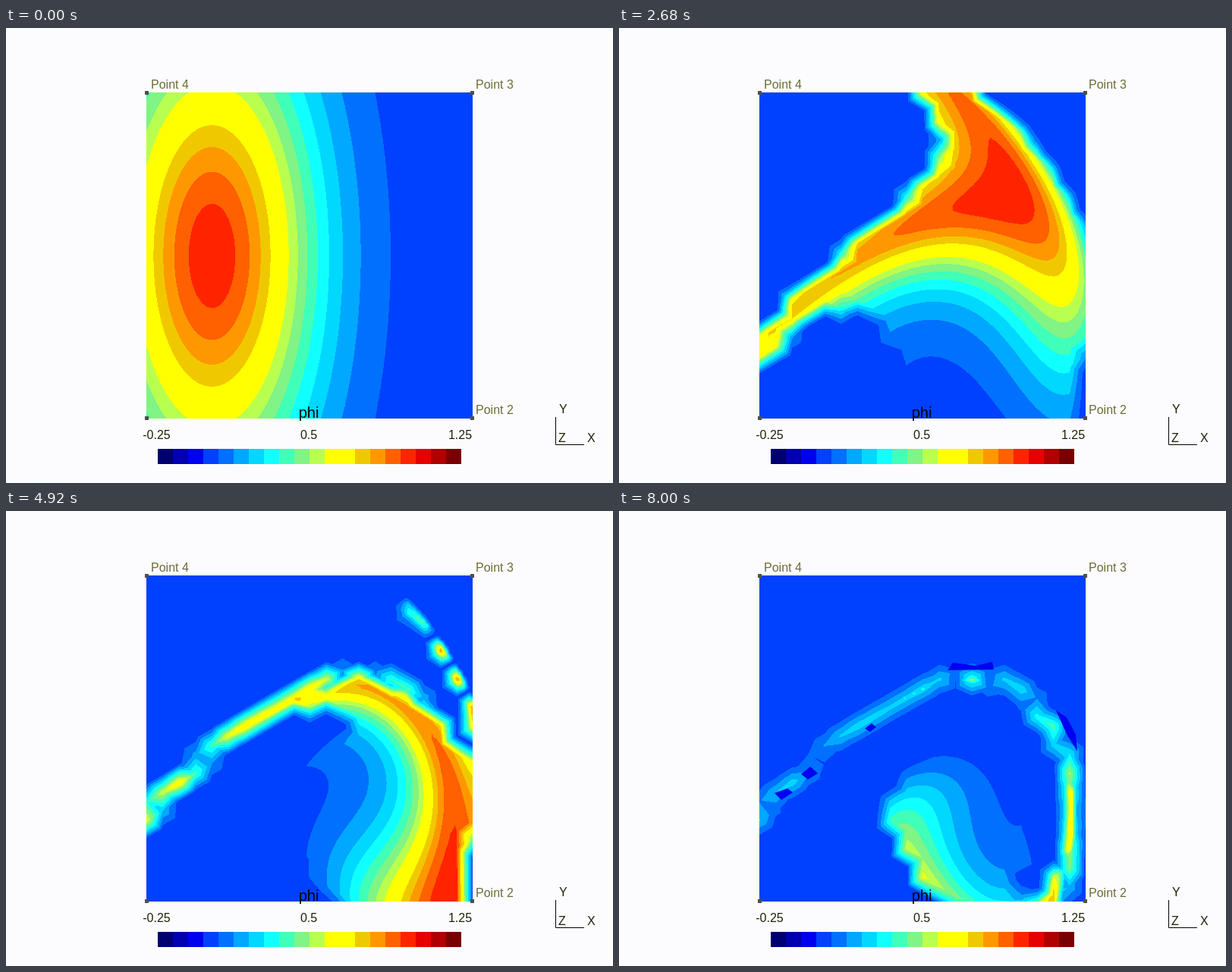
Write an HTML page with a canvas that moves like this. It is 800x600 px and loops after 8.04 s.

```html
<!DOCTYPE html>
<html>
<head>
<meta charset="utf-8">
<style>
html, body { margin: 0; width: 100%; height: 100%; overflow: hidden; background: #fcfcff; }
canvas { display: block; }
</style>
</head>
<body>
<canvas id="stage" width="800" height="600"></canvas>
<script>
const ctx = document.getElementById('stage').getContext('2d');
const LEFT = 185, TOP = 85, SIZE = 430;
const LOOP = 8040, STEP = 40;
const MIN = -0.25, BAND = 0.075;
const COLORS = ('000070 0000b0 0000f0 0040ff 0070ff 00a8ff 00d8ff 10ffff 40ffb8 80f484 ' +
  'b8ff50 ffff00 ffff00 f0c800 ff9800 ff6000 ff2400 e80000 b00000 780000').split(' ');
const PACKED = COLORS.map(c => {
  const n = parseInt(c, 16);
  return (255 << 24 | (n & 255) << 16 | (n & 0xff00) | n >> 16) >>> 0;
});

// Steady flow in unit coordinates, y up, rates per millisecond
const A = 1.63e-4, B = 1.26e-3, K = 4.5, Y0 = 0.27, XC = 0.643;
const C0 = Math.cos(K * Y0);
const velX = y => A * (C0 - Math.cos(K * y));
const velY = x => B * x * (XC - x);
const energyY = y => A * (C0 * y - Math.sin(K * y) / K);
const energyX = x => B * (XC * x * x / 2 - x * x * x / 3);
const stream = (x, y) => energyY(y) - energyY(Y0) - energyX(x);

const clamp = (v, lo, hi) => Math.max(lo, Math.min(hi, v));
const outside = (x, y, m) => x < -m || x > 1 + m || y < -m || y > 1 + m;

// Follow the flow backwards to the starting value
let inside = 1;
function trace(x, y, time) {
  const n = Math.ceil(time / 80), h = time / n;
  inside = 1;
  for (let k = 0; k < n; k++) {
    const mx = x - h / 2 * velX(y), my = y - h / 2 * velY(x);
    x -= h * velX(my);
    y -= h * velY(mx);
    if (inside && outside(x, y, 0.004)) inside = 0;
    if (!inside && outside(x, y, 0.12)) break;
  }
  return Math.exp(-((x - 0.2) ** 2) / 0.1 - ((y - 0.5) ** 2) / 0.5);
}

// Triangular mesh, sheared so that each cell splits into two triangles
const COLW = 21.5, ROWH = 12.4, ROWS = 32, SHIFT = 11;
const mask = new Float32Array(22 * ROWS), sticky = new Float32Array(22 * ROWS);
const nodeX = i => clamp(i * COLW / SIZE, 0, 1);
const nodeY = (i, j) => clamp(1 - (i + 2 * (j - SHIFT)) * ROWH / SIZE, 0, 1);
function eachNode(fn) {
  for (let i = 0; i < 22; i++)
    for (let j = 0; j < ROWS; j++) fn(i * ROWS + j, nodeX(i), nodeY(i, j));
}
function meshValue(f, px, py) {
  const p = px / COLW, r = (py / ROWH - p) / 2 + SHIFT;
  const i = Math.floor(p), j = Math.floor(r), a = p - i, b = r - j;
  const k = i * ROWS + j;
  if (a + b < 1) return f[k] * (1 - a - b) + f[k + ROWS] * a + f[k + 1] * b;
  return f[k + ROWS + 1] * (a + b - 1) + f[k + 1] * (1 - a) + f[k + ROWS] * (1 - b);
}

// Residue left on mesh nodes along the dividing streamline
function residue(x, y) {
  if (y < Y0 - 0.02 && x < XC) return 0;
  const speed = Math.hypot(velX(y), velY(x)) + 1e-6;
  const d = Math.abs(stream(x, y)) / speed * SIZE / 9;
  return Math.exp(-d * d);
}
eachNode((k, x, y) => { sticky[k] = residue(x, y); });
const stickyMap = new Float32Array(SIZE * SIZE);
for (let py = 0, k = 0; py < SIZE; py++)
  for (let px = 0; px < SIZE; px++) stickyMap[k++] = meshValue(sticky, px, py);

const CELLS = 72, W = CELLS + 1;
const grid = new Float32Array(W * W + W + 2);
const image = ctx.createImageData(SIZE, SIZE);
const pixels = new Uint32Array(image.data.buffer);
const amp = new Float32Array(SIZE);

function field(time) {
  const e = 2 / SIZE;
  eachNode((k, x, y) => {
    let sum = 0;
    for (const [dx, dy] of [[e, 0], [-e, 0], [0, e], [0, -e]]) {
      trace(clamp(x + dx, 0, 1), clamp(y + dy, 0, 1), time);
      sum += inside;
    }
    mask[k] = sum / 4;
  });
  for (let j = 0, k = 0; j < W; j++)
    for (let i = 0; i < W; i++) grid[k++] = trace(i / CELLS, 1 - j / CELLS, time);

  const rise = clamp((time - 3200) / 800, 0, 1), age = Math.max(0, time - 5880);
  for (let px = 0; px < SIZE; px++)
    amp[px] = 0.72 * rise * Math.exp(-age / (2000 + 25 * Math.max(0, px - 230)));

  for (let py = 0, k = 0; py < SIZE; py++) {
    const gy = py / SIZE * CELLS, j = Math.floor(gy), b = gy - j;
    for (let px = 0; px < SIZE; px++, k++) {
      const m = meshValue(mask, px, py);
      let v = 0;
      if (m > 0.01) {
        const gx = px / SIZE * CELLS, i = Math.floor(gx), a = gx - i, g = j * W + i;
        v = m * ((grid[g] * (1 - a) + grid[g + 1] * a) * (1 - b) +
                 (grid[g + W] * (1 - a) + grid[g + W + 1] * a) * b);
      }
      v = Math.max(v, amp[px] * stickyMap[k]);
      pixels[k] = PACKED[clamp(Math.floor((v - MIN) / BAND), 0, 19)];
    }
  }
  ctx.putImageData(image, LEFT, TOP);
}

// Small negative patches beside the residue
const DIPS = [
  [433, 210, 440, 200, 470, 204, 492, 199, 494, 209],
  [576, 263, 590, 272, 602, 295, 604, 317, 590, 294],
  [205, 372, 222, 366, 229, 371, 214, 381],
  [240, 347, 252, 337, 262, 346, 249, 354],
  [324, 287, 333, 280, 339, 285, 331, 291]
];
function dips() {
  ctx.fillStyle = '#0000f0';
  for (const d of DIPS) {
    ctx.beginPath();
    for (let i = 0; i < d.length; i += 2) ctx.lineTo(d[i], d[i + 1]);
    ctx.fill();
  }
}

function text(s, x, y, color, size = 16, align = 'left') {
  ctx.font = size + 'px "Liberation Sans", Arial, sans-serif';
  ctx.textAlign = align;
  ctx.fillStyle = color;
  ctx.fillText(s, x, y);
}

function draw(time) {
  ctx.fillStyle = '#fcfcff';
  ctx.fillRect(0, 0, 800, 600);
  field(time);
  if (time > 5000) dips();

  ctx.lineWidth = 1;
  ctx.strokeStyle = '#ffffd0';
  ctx.strokeRect(184.5, 84.5, 431, 431);
  ctx.fillStyle = '#505048';
  for (const x of [183, 612]) for (const y of [83, 512]) ctx.fillRect(x, y, 5, 5);

  const olive = '#6c6c34', ink = '#202008';
  text('Point 4', 191, 80, olive);
  text('Point 3', 619, 80, olive);
  text('Point 2', 619, 509, olive);
  text('phi', 399, 514, '#000', 20, 'center');
  text('-0.25', 198.5, 542, ink, 16, 'center');
  text('0.5', 399, 542, ink, 16, 'center');
  text('1.25', 598.5, 542, ink, 16, 'center');
  COLORS.forEach((c, i) => {
    ctx.fillStyle = '#' + c;
    ctx.fillRect(200 + 20 * i, 555, 20, 20);
  });

  ctx.strokeStyle = '#000';
  ctx.beginPath();
  ctx.moveTo(724.5, 513);
  ctx.lineTo(724.5, 549.5);
  ctx.lineTo(762, 549.5);
  ctx.stroke();
  text('Y', 729, 508, ink);
  text('Z', 728, 546, ink);
  text('X', 766, 546, ink);
}

let shown = -1;
const start = performance.now();
function tick() {
  const step = Math.floor((performance.now() - start) % LOOP / STEP);
  if (step !== shown) draw((shown = step) * STEP);
  requestAnimationFrame(tick);
}
tick();
</script>
</body>
</html>
```
